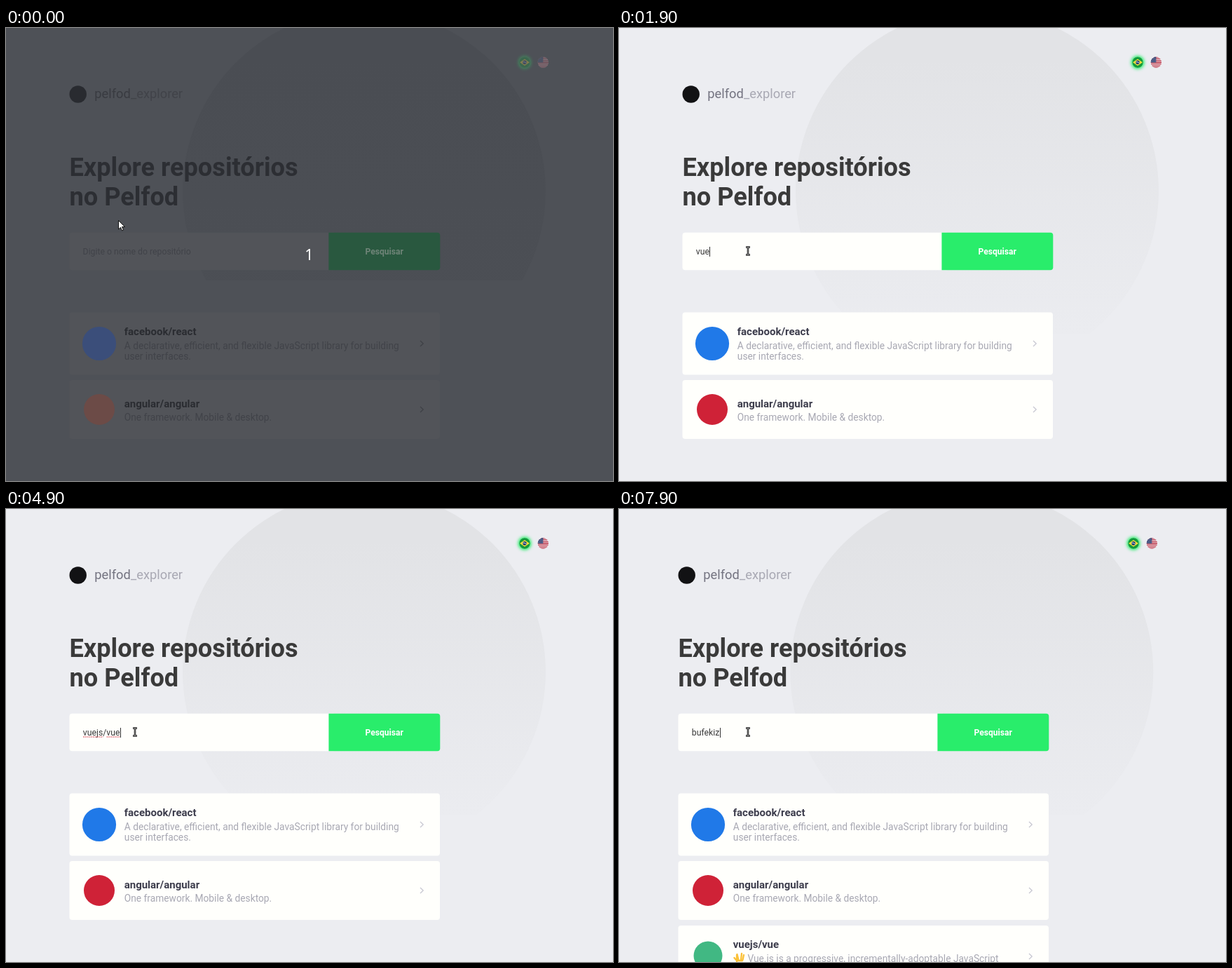
An HTML page for the animation above (8000 ms loop, 866 by 646 pixels).

```html
<!DOCTYPE html>
<html lang="pt-BR">
<head>
<meta charset="utf-8">
<title>pelfod_explorer</title>
<style>
  :root {
    --bg: #ecedf1; --card: #fffffc; --ink: #3a3a3a; --name: #3d3d4d; --soft: #a8a8b3;
    --brand: #737380; --disc: #121214; --chevron: #c8c8d2; --green: #29ed6b; --label: #fff;
    --blue: #2079e8; --red: #cf2237; --top: #e2e3e6; --bottom: #ebecf0; --flags: 1;
  }
  .dim {
    --bg: #4e5157; --card: #525459; --ink: #2c2e33; --name: #2a2c31; --soft: #414349;
    --brand: #393b41; --disc: #292b30; --chevron: #3f4147; --green: #29583f; --label: #6f8478;
    --blue: #3b4e7a; --red: #6c4b47; --top: #4a4d53; --bottom: #4c4f55; --flags: .3;
  }
  html, body { margin: 0; width: 100%; height: 100%; overflow: hidden; }
  svg { display: block; width: 866px; height: 646px; background: var(--bg); font-family: Roboto, sans-serif; }
  .card { fill: var(--card); }
  .title { font-size: 36.2px; font-weight: 700; fill: var(--ink); }
  .brand { font-size: 18.3px; fill: var(--brand); }
  .field { font-size: 12.25px; }
  .name { font-size: 15px; font-weight: 700; fill: var(--name); }
  .about { font-size: 13.78px; fill: var(--soft); }
  .soft { fill: var(--soft); }
  .chevron { fill: none; stroke: var(--chevron); stroke-width: 1.3; }
  .flags { opacity: var(--flags); }
  #count { font: 21.5px "Noto Sans", sans-serif; }
</style>
</head>
<body>
<svg id="stage" viewBox="0 0 866 646">
  <defs>
    <linearGradient id="fade" x1="0" y1="0" x2="0" y2="436" gradientUnits="userSpaceOnUse">
      <stop offset=".1" stop-color="var(--top)"/>
      <stop offset="1" stop-color="var(--bottom)"/>
    </linearGradient>
    <clipPath id="crop"><rect id="cropBox" width="866" height="436"/></clipPath>
    <clipPath id="round"><circle r="7.7"/></clipPath>
    <filter id="blur" x="-60%" y="-60%" width="220%" height="220%"><feGaussianBlur stdDeviation="2"/></filter>
  </defs>

  <g id="backdrop"><circle cx="511" cy="232.5" r="259" fill="url(#fade)" clip-path="url(#crop)"/></g>

  <g id="page">
    <g class="flags">
      <g transform="translate(740 49)">
        <circle r="9.5" fill="#29ed6b" filter="url(#blur)"/>
        <g clip-path="url(#round)">
          <circle r="8" fill="#159a3c"/>
          <path d="M-7 0L0-4.8 7 0 0 4.8z" fill="#f5dc3c"/>
          <circle r="2.7" fill="#173a78"/>
          <path d="M-2.5-.7Q0-1 2.5.9" fill="none" stroke="#fff" stroke-width=".8"/>
        </g>
      </g>
      <g transform="translate(766.3 49)" clip-path="url(#round)">
        <rect x="-8" y="-8" width="16" height="16" fill="#f3f0f1"/>
        <path id="stripes" stroke="#b8283e" stroke-width="1.3"/>
        <rect x="-8" y="-8" width="8" height="8.2" fill="#394a78"/>
        <path d="M-6-5.5h6M-7-3.5h7M-7-1.5h7" stroke="#c9cfe0" stroke-width=".7" stroke-dasharray=".8 1.2"/>
      </g>
    </g>

    <circle cx="102.7" cy="94.5" r="12.2" fill="var(--disc)"/>
    <text class="brand" x="126.3" y="100.3">pelfod</text>
    <text class="brand soft" x="178" y="100.3">_explorer</text>

    <text class="title" x="90.4" y="211">Explore repositórios</text>
    <text class="title" x="90.4" y="253">no Pelfod</text>

    <rect class="card" x="90.5" y="291.8" width="380" height="53.4" rx="4"/>
    <path d="M460.4 291.8H615.3a4 4 0 0 1 4 4v45.4a4 4 0 0 1-4 4H460.4z" fill="var(--green)"/>
    <text x="539.7" y="323" text-anchor="middle" font-size="12.1" font-weight="700" fill="var(--label)">Pesquisar</text>
    <text id="hint" class="field soft" x="109.6" y="323">Digite o nome do repositório</text>
    <text id="typed" class="field" x="109.8" y="323" fill="#3a3a3a"></text>
    <path id="misspelt" d="M110 325h28.5M143.5 325h20" stroke="#dc4452" stroke-width="1.2" stroke-dasharray="2 .8"/>
    <rect id="caret" y="312" width="1" height="14" fill="#333"/>

    <rect class="card" x="90.5" y="405.5" width="528.5" height="89" rx="4"/>
    <circle cx="133" cy="450" r="24.1" fill="var(--blue)"/>
    <text class="name" x="168.7" y="437.5">facebook/react</text>
    <text class="about" x="168.8" y="457.5">A declarative, efficient, and flexible JavaScript library for building</text>
    <text class="about" x="168.8" y="473">user interfaces.</text>
    <path class="chevron" d="M591 446l4.2 4-4.2 4"/>

    <rect class="card" x="90.5" y="502" width="528.5" height="84" rx="4"/>
    <circle cx="133" cy="544" r="22" fill="var(--red)"/>
    <text class="name" x="168.7" y="540.5">angular/angular</text>
    <text class="about" x="168.8" y="560">One framework. Mobile &amp; desktop.</text>
    <path class="chevron" d="M591 540l4.2 4-4.2 4"/>

    <g id="added">
      <rect class="card" x="90.5" y="594" width="528.5" height="89" rx="4"/>
      <circle cx="133" cy="637" r="20.5" fill="#41b883"/>
      <text class="name" x="168.7" y="626.3">vuejs/vue</text>
      <path d="M174 646v-10M176.5 643l-2-8M180 643l1-9M182.5 643l1.5-7M173 643l-2.5-3M175 644h7" fill="none" stroke="#fbc138" stroke-width="2.3" stroke-linecap="round"/>
      <text class="about" x="189.4" y="646">Vue.js is a progressive, incrementally-adoptable JavaScript</text>
      <path class="chevron" d="M591 634l4.2 4-4.2 4"/>
    </g>
  </g>

  <path id="arrow" d="M.5.5V13l3-2.7 2 4.7 2-.9-2-4.5h4z" fill="#fff" stroke="#111"/>
  <g id="beam" fill="none">
    <path d="M-3-5.5h2.2L0-5 .8-5.5H3M0-5V5M-3 5.5h2.2L0 5 .8 5.5H3" stroke="#222" stroke-width="2.6"/>
    <path d="M-2.4-5.5h1.6L0-5 .8-5.5h1.6M0-5V5M-2.4 5.5h1.6L0 5 .8 5.5h1.6" stroke="#bbb" stroke-width=".7"/>
  </g>
  <text id="count" x="432.5" y="331" text-anchor="middle" fill="#fff">1</text>
</svg>
<script>
const LOOP = 8000, SUBMIT = 5000;
const $ = id => document.getElementById(id);
const show = (id, on) => $(id).setAttribute('visibility', on ? 'visible' : 'hidden');
const move = (id, x, y = 0) => $(id).setAttribute('transform', `translate(${x} ${y})`);

// Each track lists [start time, ...values]; a value holds until the next start.
const at = (track, t) => track.findLast(step => step[0] <= t);
const typing = (word, times) => times.map(([time, length]) => [time, word.slice(0, length)]);

const texts = [
  [0, ''],
  ...typing('vuejs/vue', [[1700, 1], [1800, 2], [1900, 3], [2200, 4], [2400, 5], [2800, 6], [3300, 7], [3500, 8], [3700, 9]]),
  [SUBMIT, ''],
  ...typing('bufekiz', [[6800, 1], [7100, 3], [7400, 4], [7700, 5], [7800, 6], [7900, 7]])
];
const carets = [[0, 0], [900, 1], [1300, 0], [1700, 1], [4200, 0], [4900, 1], [6000, 0], [6100, 1], [6700, 0], [6800, 1]];
const pointer = [
  [0, 160, 274], [200, 165, 283], [300, 171, 293], [400, 178, 305.5],
  [700, 180, 309], [800, 182, 314], [900, 183, 317], [1100, 184, 318]
];

$('stripes').setAttribute('d', [0, 1, 2, 3, 4, 5, 6].map(i => `M-8 ${i * 2.4 - 7.2}h16`).join(''));

function draw(t) {
  const dim = t < 100, submitted = t >= SUBMIT;
  $('stage').classList.toggle('dim', dim);
  $('cropBox').setAttribute('height', dim ? 360 : 436);
  show('count', dim);

  move('page', submitted ? -6 : 0);
  move('backdrop', submitted ? -7.7 : 0);
  show('added', submitted);

  const text = at(texts, t)[1];
  $('typed').textContent = text;
  show('hint', !text);
  show('misspelt', t >= 4700 && !submitted);
  const width = text ? $('typed').getComputedTextLength() : 0;
  $('caret').setAttribute('x', Math.round(110 + width));
  show('caret', at(carets, t)[1]);

  const [, x, y] = at(pointer, t), overField = y > 300;
  show('arrow', !overField);
  show('beam', overField);
  move(overField ? 'beam' : 'arrow', x, y);
}

const start = performance.now();
function tick() {
  draw((performance.now() - start) % LOOP);
  requestAnimationFrame(tick);
}
tick();
</script>
</body>
</html>
```
